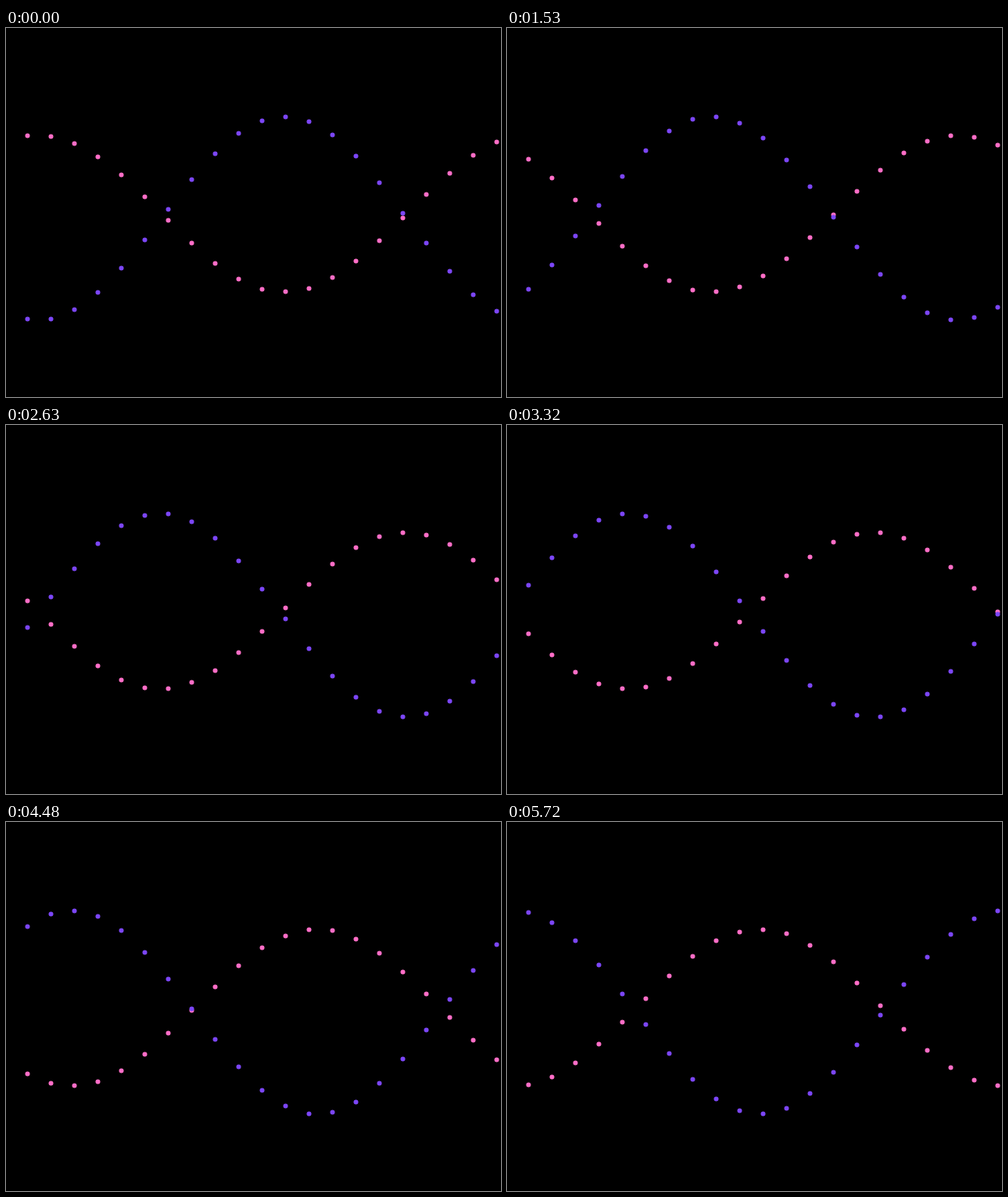
Animation of 633x471 px, one loop 5.8 s. Source, as an HTML page with a canvas:

```html
<!DOCTYPE html>
<html lang="en">
<head>
<meta charset="utf-8">
<title>Crossing waves</title>
<style>
  html, body { margin: 0; width: 100%; height: 100%; overflow: hidden; background: #000; }
  canvas { display: block; }
</style>
</head>
<body>
<canvas id="stage" width="633" height="471"></canvas>
<script>
const ctx = document.getElementById("stage").getContext("2d");
const LOOP = 5800;
const STEPS = 75;
const LEAD = 18; // ms by which each step comes early
const DOTS = 21;
const SPACING = 30;
const RADIUS = 3;
const START_PHASE = -0.1413;
const TICKS_PER_STEP = 4.686;

// The last wave is painted on top.
const waves = [
  { mid: 237, amp: -100, color: "#ff6ec7" },
  { mid: 243, amp: 130, color: "#7c46f7" }
];

function stepAt(ms) {
  return Math.min(STEPS - 1, Math.floor((ms + LEAD) * STEPS / LOOP));
}

function draw(step) {
  const phase = START_PHASE + 0.01 * Math.round(step * TICKS_PER_STEP);
  ctx.fillStyle = "#000";
  ctx.fillRect(0, 0, 633, 471);
  for (const { mid, amp, color } of waves) {
    ctx.fillStyle = color;
    for (let k = 0; k < DOTS; k++) {
      const y = Math.floor(mid + amp * Math.cos(0.3 * k + phase));
      ctx.beginPath();
      ctx.arc(27.5 + SPACING * k, y + 0.5, RADIUS, 0, 2 * Math.PI);
      ctx.fill();
    }
  }
}

const begin = performance.now();

function tick() {
  draw(stepAt((performance.now() - begin) % LOOP));
  requestAnimationFrame(tick);
}
tick();
</script>
</body>
</html>
```
